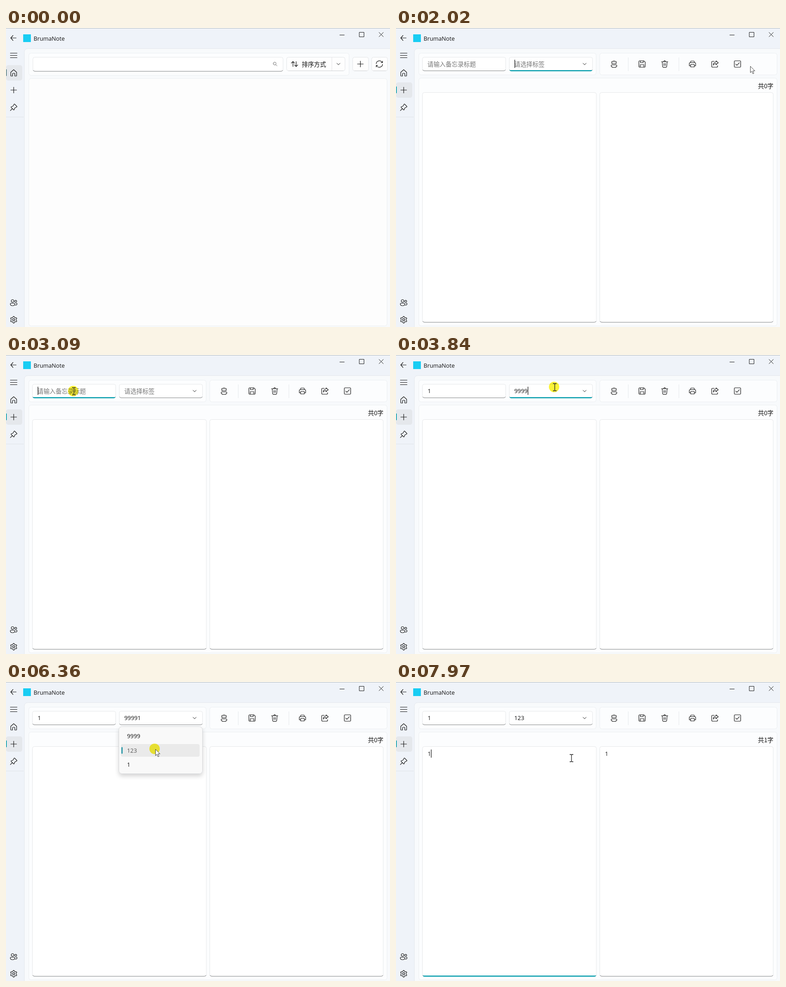
Animation, 849 px wide and 660 px high, one loop 8 s. Source, as an HTML page:

```html
<!DOCTYPE html>
<html lang="zh-CN">
<head>
<meta charset="utf-8">
<title>BrumaNote</title>
<style>
html, body { margin: 0; width: 100%; height: 100%; overflow: hidden; background: #eff3f9; }
svg { display: block; width: 849px; height: 660px; }
text { font: 12.8px "Open Sans", "Noto Sans", sans-serif; fill: #111; white-space: pre; }
.cjk { font: 13.4px "Noto Sans CJK SC", "Noto Sans CJK", sans-serif; }
.hint { fill: #777; }
.ico { fill: none; stroke: #1a1a1a; stroke-width: 1.2; stroke-linecap: round; stroke-linejoin: round; }
.thin { stroke-width: 1; }
.grey { stroke: #777; stroke-width: 1; }
</style>
</head>
<body>
<svg id="stage" viewBox="0 0 849 660"></svg>
<script>
const LOOP = 8000;
const TEAL = '#0a9fae';

const box = (x, y, w, h, r, fill, stroke, extra = '') =>
  `<rect x="${x + .5}" y="${y + .5}" width="${w - 1}" height="${h - 1}" rx="${r}" fill="${fill}" stroke="${stroke}" ${extra}/>`;
const card = (x, y, w, h, extra) => box(x, y, w, h, 5, '#fcfdfe', '#eceff2', extra);
const icon = (x, y, d, cls = '') => `<path class="ico ${cls}" transform="translate(${x} ${y})" d="${d}"/>`;
const text = (x, y, s, cls = '', extra = '') => `<text x="${x}" y="${y}" class="${cls}" ${extra}>${s}</text>`;
const circle = (x, y, r) => `M${x - r} ${y}a${r} ${r} 0 1 0 ${2 * r} 0a${r} ${r} 0 1 0 ${-2 * r} 0`;

// Text field with a darker underline and a hidden accent line for focus
const field = (x, y, w, h, id) => {
  const b = y + h;
  return box(x, y, w, h, 4, '#fff', '#e6e8ea') +
    `<path d="M${x + 1} ${b - 3}q1 2.5 4 2.5H${x + w - 5}q3 0 4 -2.5" fill="none" stroke="#858789"/>` +
    (id ? `<path id="${id}" d="M${x + 1} ${b - 2}h${w - 2}q-1 2.5 -4 2.5H${x + 5}q-3 0 -4 -2.5z" fill="${TEAL}"/>` : '');
};
const button = (x, y, w, h) =>
  box(x, y, w, h, 4, '#fefefe', '#e3e5e8') + `<path d="M${x + 4} ${y + h - .5}h${w - 8}" stroke="#cfd1d4"/>`;

const gear = () => {
  let d = '';
  for (let i = 0; i < 24; i++) {
    const a = (i - .5) * Math.PI / 12;
    const r = i % 4 < 2 ? 7.4 : 5.5;
    d += `${i ? 'L' : 'M'}${(r * Math.sin(a)).toFixed(2)} ${(-r * Math.cos(a)).toFixed(2)}`;
  }
  return d + 'Z' + circle(0, 0, 2.4);
};

const PLUS = 'M-6.5 0H6.5M0 -6.5V6.5';
const CHEVRON = 'M-3.5 -1.7L0 1.8L3.5 -1.7';

const chrome = `
  <rect width="849" height="660" fill="#eff3f9"/>
  <rect id="rail" y="45" width="50" height="615" fill="#f2f3f3"/>
  <path d="M0 .5H849" stroke="#b4bbc3"/>
  <path d="M849 45.5H48.5q-8 0 -8 8V660H849z" fill="#f8fafc"/>
  <path d="M849 45.5H48.5q-8 0 -8 8V660" fill="none" stroke="#e4e8ed"/>
  <path d="M0 196.5H39" stroke="#e0e4e8"/>
  <g id="mark"><rect x="0" y="82" width="36" height="34" rx="5" fill="#e5e8ec"/>
    <rect id="pip" x="0" y="91" width="1.6" height="15" rx=".8"/></g>
  <rect x="38" y="14" width="17" height="17" fill="#19cdf3"/>
  ${text(61, 27.5, 'BrumaNote', '', 'style="font-size:12.7px"')}
  ${icon(16.5, 22, 'M-1 -5.5L-6 0L-1 5.5M-6 0H6')}
  ${icon(17, 60.5, 'M-7.5 -5H7.5M-7.5 0H7.5M-7.5 5H7.5', 'thin')}
  ${icon(17, 99, 'M-6.5 -1.3L0 -7L6.5 -1.3V6.2q0 .8 -.8 .8H2.5V2q0 -1 -1 -1H-1.5q-1 0 -1 1V7H-5.7q-.8 0 -.8 -.8z')}
  ${icon(17, 137, PLUS)}
  ${icon(17, 175, 'M2 -7L7 -2Q7.5 -1 6.3 -.5L2.5 1.5L1 5.5Q.5 6.3 -.3 5.5L-5.5 .3Q-6.3 -.5 -5.5 -1L-1.5 -2.5L.5 -6.3Q1 -7.5 2 -7M-3 3L-7.3 7.3')}
  ${icon(17, 606, circle(-2.5, -3.5, 3) + circle(4.5, -2.7, 2.2) + 'M-7.5 3q0 -1.5 1.5 -1.5H1q1.5 0 1.5 1.5q0 4 -5 4t-5 -4M4.5 1.5H6q1.5 0 1.5 1.3q0 3 -4 2.8')}
  ${icon(17, 644, gear())}
  ${icon(743, 15, 'M-5 .5H5', 'thin')}
  ${icon(787, 15, 'M-5.5 -5.5H4.5V4.5H-5.5z', 'thin')}
  ${icon(829.5, 14.5, 'M-4.7 -4.7L4.7 4.7M4.7 -4.7L-4.7 4.7', 'thin')}`;

const home = `<g id="home">
  ${card(50, 55, 709, 50)}
  ${field(59, 64, 554, 32)}
  ${icon(595, 79.5, circle(-1, -1, 3.2) + 'M1.4 1.4L4.3 4.3', 'grey')}
  ${button(620, 64, 130, 31)}
  <path d="M720.5 65V94" stroke="#e3e5e8"/>
  ${icon(638, 79.5, 'M-3.5 5.5V-5.5M-7 -2L-3.5 -5.5L0 -2M3.5 -5.5V5.5M0 2L3.5 5.5L7 2')}
  ${text(654, 84.7, '排序方式', 'cjk')}
  ${icon(735, 79.5, CHEVRON, 'thin')}
  ${button(766, 64, 36, 31)}${icon(783.5, 79.5, PLUS)}
  ${button(808, 64, 36, 31)}
  ${icon(825.5, 79.5, 'M-7 -.5A7 7 0 0 1 6 -3.7M7 -6.5V-3H3.5M7 .5A7 7 0 0 1 -6 3.7M-7 6.5V3H-3.5')}
  ${card(50, 111, 793, 547, 'id="list"')}
</g>`;

const editor = `<g clip-path="url(#view)"><g id="editor">
  ${card(50, 55, 393, 49)}${card(450, 55, 393, 49)}${card(50, 110, 793, 548)}
  ${field(58, 64, 185, 31, 'titleLine')}
  ${text(69.5, 84.5, '请输入备忘录标题', 'cjk hint', 'id="titleHint"')}
  ${text(70, 84.3, '', '', 'id="title"')}
  ${field(250, 64, 185, 31, 'tagLine')}
  ${text(261.5, 84.5, '请选择标签', 'cjk hint', 'id="tagHint"')}
  ${text(261.5, 84.3, '', '', 'id="tag"')}
  <rect id="arrowHover" x="403" y="67" width="28" height="25" rx="4" fill="#f3f4f5"/>
  ${icon(417, 79.5, CHEVRON, 'thin')}
  <path d="M513.5 65V95M625.5 65V95" stroke="#e6e9ec"/>
  ${icon(482, 79.5, 'M0 -7.5V-6M-3 -6H3q2 0 2 2V-2.5q0 2 -2 2H-3q-2 0 -2 -2V-4q0 -2 2 -2M-2 -3.3V-3M2 -3.3V-3M-4.5 2H4.5q1.8 0 1.8 1.6Q6 7.5 0 7.5T-6.3 3.6Q-6.3 2 -4.5 2')}
  ${icon(544, 79.5, 'M-5.5 -7H4L7 -4V5.5q0 1.5 -1.5 1.5H-5.5q-1.5 0 -1.5 -1.5V-5.5q0 -1.5 1.5 -1.5M-3.5 -7V-3H2.5V-7M-4 7V1.5H4V7')}
  ${icon(594, 79.5, 'M-7 -5H7M-2 -5q0 -2.3 2 -2.3T2 -5M-5.5 -5L-4.4 6q.2 1.3 1.4 1.3H3q1.2 0 1.4 -1.3L5.5 -5M-1.5 -1.5V3.5M1.5 -1.5V3.5')}
  ${icon(655.5, 79.5, 'M-4 -3V-5.5q0 -1 1 -1H3q1 0 1 1V-3M-4 4H-7V-1.5q0 -1.5 1.5 -1.5H5.5q1.5 0 1.5 1.5V4H4M-4 1H4V6.5H-4z')}
  ${icon(705, 79.5, 'M-1.5 -6H-5q-2 0 -2 2V5q0 2 2 2H4q2 0 2 -2V3.5M2.5 -7L7.5 -2.7L2.5 1.5V-1Q-2 -1 -3.5 2.5Q-3 -4.5 2.5 -4.5z')}
  ${icon(755, 79.5, 'M-5.5 -7H5.5q1.5 0 1.5 1.5V5.5q0 1.5 -1.5 1.5H-5.5q-1.5 0 -1.5 -1.5V-5.5q0 -1.5 1.5 -1.5M-3.8 .2L-1.2 2.8L4 -2.8')}
  ${text(834.5, 133, '', 'cjk', 'id="count" text-anchor="end" style="font-weight:500"')}
  ${field(58, 142, 385.5, 508, 'bodyLine')}
  ${field(450, 142, 384.5, 508)}
  ${text(70, 163.3, '1', 'typed')}${text(462, 163.3, '1', 'typed')}
  <rect id="caret" width="1.2" height="18" fill="#111"/>
</g></g>`;

const menu = `<g clip-path="url(#drop)"><g id="menu">
  ${box(249, 98, 186, 105, 7, '#f9f9f9', '#d6d8da', 'filter="url(#shade)"')}
  <rect id="row" x="254" width="174" height="28" rx="4" fill="#eaeaea"/>
  <rect id="rowPip" x="255" y="143.500" width="3" height="15" rx="1.500" fill="#3b9fae"/>
  ${['9999', '123', '1'].map((s, i) => text(267.5, 124.300 + i * 31.5, s, 'item')).join('')}
</g></g>`;

const pointer = `<g id="pointer">
  <circle id="halo" cx="-1.500" cy="-.5" r="11.500" fill="#fbf337" style="mix-blend-mode:multiply"/>
  <path id="arrow" d="M.5 .5V14.500L3.700 11.500L6 17L8.300 16L6 10.700H10.500z" fill="#fff" stroke="#333" stroke-width=".9"/>
  <path id="beam" d="M-4 -8H-1.500Q0 -8 0 -6.500Q0 -8 1.500 -8H4M0 -7V7M-4 8H-1.500Q0 8 0 6.500Q0 8 1.500 8H4" fill="none" stroke="#222" stroke-width="1.300"/>
  <path id="hand" d="M-2.500 11V.5Q-2.500 -1.300 -1 -1.300T.6 .5V5Q2 4 3 5.500Q4.500 4.700 5.300 6.200Q7.300 5.800 7.300 8V12Q7.300 15 5.500 17.500H-1.500Q-3 14.500 -6 11.500Q-7 9.500 -5 9.300Q-3.500 9.500 -2.500 11z" fill="#fff" stroke="#333"/>
</g>`;

const stage = document.getElementById('stage');
stage.innerHTML = `<defs>
  <clipPath id="view"><rect x="41" y="46" width="808" height="614"/></clipPath>
  <clipPath id="drop"><rect x="230" y="97" width="224" height="135"/></clipPath>
  <filter id="shade" x="-20%" y="-20%" width="140%" height="150%">
    <feDropShadow dx="0" dy="5" stdDeviation="5" flood-color="#000" flood-opacity=".16"/></filter>
</defs>` + chrome + home + editor + menu + pointer;

const $ = id => document.getElementById(id);
const show = (id, on) => { $(id).style.display = on ? '' : 'none'; };
const move = (id, x, y) => $(id).setAttribute('transform', `translate(${x} ${y})`);
const clamp = v => Math.max(0, Math.min(1, v));
const easeOut = v => 1 - (1 - clamp(v)) ** 2;
const at = (steps, t) => steps.filter(s => s[0] <= t).pop()[1];

// time, x, y of the pointer's hot spot
const PATH = [
  [650, 801, 648], [920, 754, 451], [1190, 754, 451], [1390, 768, 152], [1600, 783, 84],
  [2020, 783, 84], [2220, 786, 89], [2750, 150, 80], [3360, 150, 80], [3560, 351, 71],
  [3840, 351, 71], [4040, 345, 74], [4180, 345, 74], [4380, 334, 102], [5130, 334, 102],
  [5400, 407, 77], [5880, 407, 77], [6200, 330, 148], [6480, 330, 148], [6710, 268, 193],
  [7570, 268, 193], [7700, 330, 175], [7840, 330, 175], [7970, 388, 168]
];
const SHAPE = [[0, 'arrow'], [2700, 'beam'], [4280, 'arrow'], [5230, 'beam'], [5370, 'hand'], [5950, 'arrow'], [6560, 'beam']];
const FOCUS = [[0, ''], [1660, 'tag'], [2890, 'title'], [3560, 'tag'], [5640, ''], [6770, 'body']];
const TITLE = [[0, ''], [3100, '1']];
const TAG = [[0, ''], [3600, '9'], [3670, '99'], [3740, '999'], [3800, '9999'], [4960, '99991'], [6500, '123']];
const BLINK = [[0, 0], [1940, 1940], [2890, 2890], [3100, 3100], [3560, 3560], [3800, 3800], [4960, 4960], [6770, 6830]];
const PAGE = 1660, OPEN = 5640, PRESS = 6330, PICK = 6500, TYPED = 7110;

function pointerAt(t) {
  const i = PATH.findIndex(p => p[0] > t);
  if (i < 0) return PATH[PATH.length - 1].slice(1);
  if (i === 0) return PATH[0].slice(1);
  const [t0, x0, y0] = PATH[i - 1], [t1, x1, y1] = PATH[i];
  const k = (t - t0) / (t1 - t0), e = k * k * (3 - 2 * k);
  return [x0 + (x1 - x0) * e, y0 + (y1 - y0) * e];
}

function render(t) {
  const editing = t >= PAGE;
  const focus = at(FOCUS, t), title = at(TITLE, t), tag = at(TAG, t), shape = at(SHAPE, t);
  const [x, y] = pointerAt(t);

  // Window and pages
  const dim = t >= 1190 && t < 1900;
  show('rail', dim);
  $('list').setAttribute('fill', dim ? '#fafafa' : '#fdfdfd');
  show('home', !editing);
  show('editor', editing);
  move('editor', 0, 76 * (1 - easeOut((t - PAGE) / 260)));
  move('mark', 0, editing ? 38 : 0);
  $('pip').setAttribute('fill', editing ? TEAL : '#5f8389');

  // Fields
  $('title').textContent = title;
  $('tag').textContent = tag;
  show('titleHint', !title);
  show('tagHint', !tag);
  for (const name of ['title', 'tag', 'body']) show(name + 'Line', focus === name);
  show('arrowHover', shape === 'hand');
  const typed = t >= TYPED;
  $('count').textContent = `共${typed ? 1 : 0}字`;
  document.querySelectorAll('.typed').forEach(n => { n.style.display = typed ? '' : 'none'; });

  // Caret
  const spot = {
    title: [70, 70, title.length], tag: [262, 70, tag.length], body: [70, 149, +typed]
  }[focus];
  const beat = Math.max(0, t - at(BLINK, t));
  show('caret', spot && Math.floor(beat / 540) % 2 === 0);
  if (spot) move('caret', spot[0] + spot[2] * 7.3, spot[1]);

  // Drop-down list
  const row = Math.floor((y - 104) / 31.5);
  const hover = t > 5950 && row >= 0 && row < 3;
  show('menu', t >= OPEN && t < PICK);
  move('menu', 0, -105 * (1 - easeOut((t - OPEN) / 240)));
  show('row', hover);
  $('row').setAttribute('y', 105.5 + row * 31.5);
  show('rowPip', hover && row === 1);
  document.querySelectorAll('.item').forEach((n, i) => {
    n.style.fill = i === row && t >= PRESS ? '#555' : '#111';
  });

  // Pointer
  show('pointer', t >= 650);
  move('pointer', x, y);
  for (const s of ['arrow', 'beam', 'hand']) show(s, s === shape);
  show('halo', t >= 2820 && t < 6910);
}

function tick() {
  render(performance.now() % LOOP);
  requestAnimationFrame(tick);
}
tick();
</script>
</body>
</html>
```
